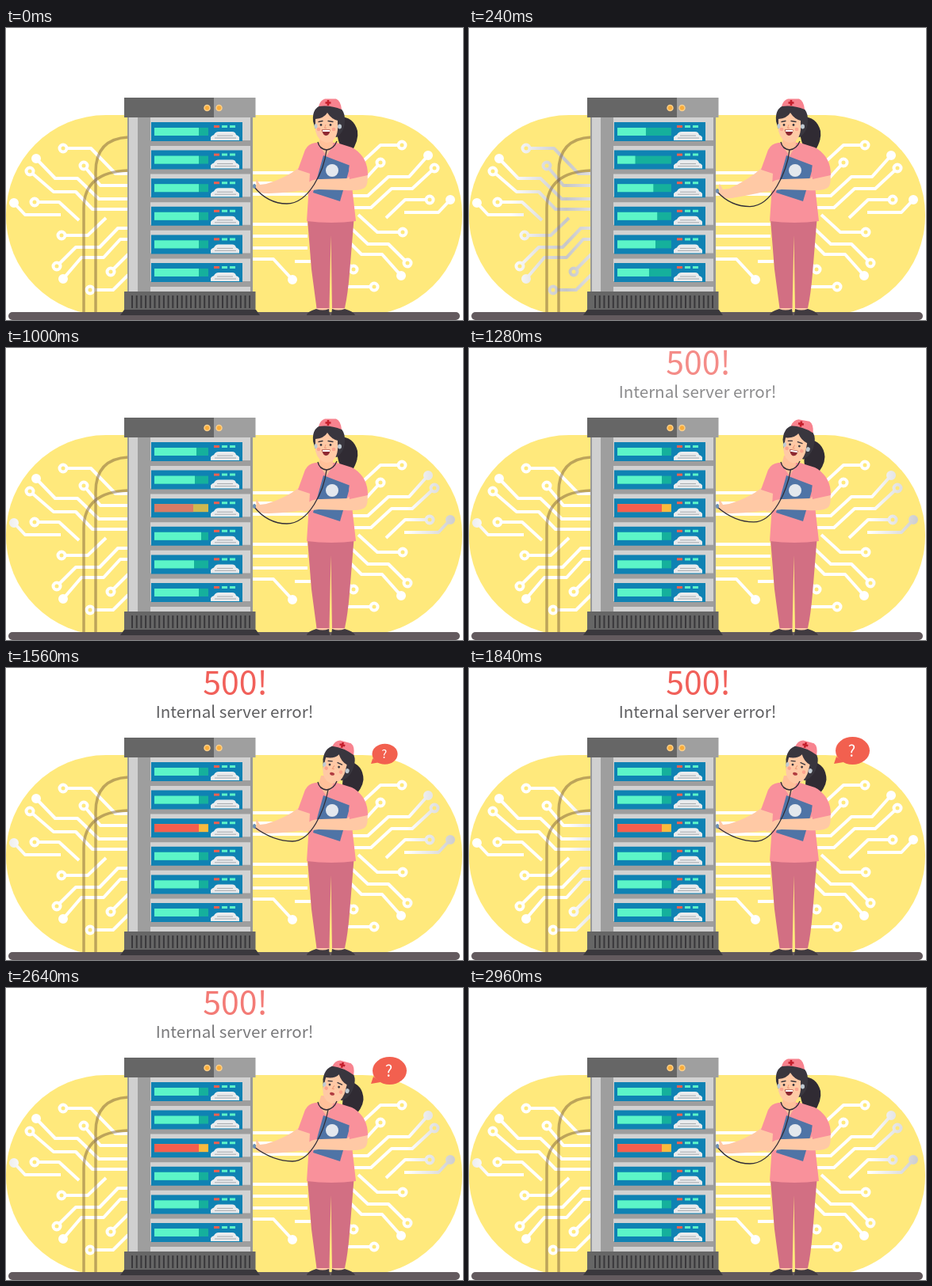
Write an HTML page that moves like this. It is 576 by 369 pixels and loops after 3 s.

```html
<!DOCTYPE html>
<html lang="en">
<head>
<meta charset="utf-8">
<style>
  html, body { margin: 0; width: 100%; height: 100%; overflow: hidden; background: #fff; }
  svg { display: block; width: 576px; height: 369px; }
  text { font-family: "Noto Sans CJK SC", "Noto Sans CJK JP", "Noto Sans", sans-serif; font-weight: 500; text-anchor: middle; }
</style>
</head>
<body>
<svg viewBox="0 0 576 369">
  <defs>
    <linearGradient id="pulse" gradientUnits="userSpaceOnUse" x1="-690" x2="70">
      <stop offset="0" stop-color="#fff"/><stop offset=".092" stop-color="#c6c6c8"/>
      <stop offset=".184" stop-color="#fff"/><stop offset=".816" stop-color="#fff"/>
      <stop offset=".908" stop-color="#c6c6c8"/><stop offset="1" stop-color="#fff"/>
    </linearGradient>
  </defs>

  <rect y="110" width="575" height="253" rx="126" fill="#ffe97c"/>
  <g id="circuits" fill="none" stroke="url(#pulse)" stroke-width="4" stroke-linejoin="round"></g>
  <g fill="none" stroke="#7d6038" stroke-opacity=".5" stroke-width="3.5">
    <path d="M154 138Q113 140 113 182V360"/>
    <path d="M154 180Q98 182 98 228V360"/>
  </g>
  <path d="M8 364H567" stroke="#635a5e" stroke-width="10" stroke-linecap="round"/>

  <g id="rack">
    <path d="M153 112H311V334H153Z" fill="#999"/>
    <path d="M155 112H166V334H155Z" fill="#d0d0d0"/>
    <path d="M166 112H182V334H166Z" fill="#9e9e9e"/>
    <path d="M182 112H308V334H182Z" fill="#d2d2d2"/>
    <path d="M149 88H262V113H149Z" fill="#666"/>
    <path d="M262 88H314.500V113H262Z" fill="#9f9f9f"/>
    <g fill="#f9ad3c" stroke="#fcd08a" stroke-width="1.500">
      <circle cx="253.500" cy="101" r="3.500"/><circle cx="268.500" cy="101" r="3.500"/>
    </g>
    <path d="M149 333H314.500V357H149Z" fill="#666"/>
    <path d="M158 346H308" stroke="#39383b" stroke-width="16" stroke-dasharray="2 3.700"/>
    <path d="M149 356H315L320 363H144Z" fill="#3a383d"/>
  </g>

  <g id="nurse">
    <path id="arm" fill="#ffc9a5"/>
    <path d="M391 350H408V358H391ZM411 350H427V358H411Z" fill="#ffc9a5"/>
    <path d="M379 363Q380 358 391 355Q399 358 407 355L408 363ZM410 363L411 355Q419 358 427 355Q438 358 440 363Z" fill="#403a40"/>
    <path d="M380 242H438.500L433 310Q431 335 427 354H411L409.500 262L407.500 354H391.500L385 305Z" fill="#d26f83"/>
    <g id="ponytail"><path d="M418 112Q438 111 443 130Q445 142 435 157Q429 150 424 151Q415 144 418 112Z" fill="#302b33"/></g>
    <path d="M390 145Q381 146 377 154L368 179L383 184L379 244Q410 248 441 244L436 200L455 188Q452 158 436 151L417 145Z" fill="#f9919b"/>
    <path d="M397 136H412V148L404 162L394 147Z" fill="#ffc09a"/>
    <path d="M400 161L434 174L421 219L387 208Z" fill="#4f74a6"/>
    <circle cx="411" cy="180" r="8" fill="#e3e8ee"/>
    <path d="M455 181Q458 200 450 203Q443 206 427 205L394 204Q383 205 374 207L379 197Q386 190 397 191L430 190L436 184Z" fill="#ffc9a5"/>
    <path d="M440 154Q456 164 456 186L433 191Q429 175 440 154Z" fill="#f9919b"/>

    <g id="head">
      <path d="M387 118Q385 98 404 96Q426 96 427 114Q428 130 417 138L391 131Z" fill="#39363e"/>
      <path d="M390 115Q401 114 405 107Q410 115 418 117V129Q416 144 404 145Q393 143 390 130Z" fill="#ffc9a5"/>
      <path d="M394 118.500L399 117.500M406 117.500L412 118.500" stroke="#39363e" stroke-width="1.300" stroke-linecap="round"/>
      <g fill="#39363e"><circle cx="397" cy="122.500" r="1.400"/><circle cx="409" cy="122.500" r="1.400"/></g>
      <g fill="#fba58f"><circle cx="394" cy="128" r="2.300"/><circle cx="413" cy="128" r="2.300"/></g>
      <path d="M403 122L401.500 126.500H404" fill="none" stroke="#eb9a78"/>
      <g id="smile">
        <path d="M398 128.500H408.500Q408 136 403 136Q399 135 398 128.500Z" fill="#8e2932"/>
        <path d="M399 129H408V131H399Z" fill="#fff"/>
      </g>
      <ellipse id="frown" cx="403" cy="133" rx="3" ry="1.900" fill="#b13b40"/>
      <g fill="#bfcad2"><ellipse cx="390.500" cy="124" rx="2" ry="3"/><ellipse cx="420.500" cy="124.500" rx="2.500" ry="3"/></g>
      <path d="M394 99Q396 91 402 89.500H416Q422 92 423 103Q409 97 394 99Z" fill="#f8838f"/>
      <path d="M406 91V98M402.500 94.500H409.500" stroke="#c51f2c" stroke-width="2.600"/>
    </g>
    <g fill="none" stroke="#302d38" stroke-width="1.300">
      <path d="M393 144Q395 153 404 154Q413 153 417 143"/>
      <path id="cord"/>
    </g>
    <ellipse id="disc" cx="313" rx="2" ry="3" fill="#6e8fb5"/>
  </g>

  <g id="bubble">
    <path d="M463 112L460 121L472 119Z" fill="#f2604f"/>
    <ellipse cx="483.500" cy="104.500" rx="21.500" ry="17.500" fill="#f2604f"/>
    <text x="482.500" y="111.500" font-size="20" fill="#fff">?</text>
  </g>
  <g id="message">
    <text x="289" y="33" font-size="41" fill="#f1605a">500!</text>
    <text x="288" y="63" font-size="20.600" fill="#5e5e60">Internal server error!</text>
  </g>
</svg>

<script>
const LOOP = 3000;
const FULL = 56;
const $ = id => document.getElementById(id);

// Traces: a path starting at its node, then the node type (ring, dot or none).
const traces = [
  ['M72 152H107L138 184H154', 'ring'], ['M98 174L119 199H154', 'ring'],
  ['M38 165L62 190H90L117 216H154', 'dot'], ['M30 181L60 207H88L109 229H154', 'ring'],
  ['M36 220H67L92 243', 'ring'], ['M10 221L24 236H69', 'dot'],
  ['M70 262H103L126 240', 'ring'], ['M64 301L88 277H118L141 253H154', 'ring'],
  ['M72 317L95 290H123L144 267H154', 'dot'], ['M132 308L154 286', 'ring'],
  ['M106 331H135L154 312', 'ring'],
  ['M499 148H472L444 174', 'ring'], ['M472 170L450 194H436', 'ring'],
  ['M532 161L508 188H482L456 212H436', 'dot'], ['M540 177L512 203H486L460 227H436', 'ring'],
  ['M534 217H503L479 240', 'ring'], ['M560 217L545 233H502', 'dot'],
  ['M500 258H468L444 236', 'ring'], ['M506 297L482 273H456L436 254', 'ring'],
  ['M498 313L474 286H448L434 272', 'dot'], ['M438 305L420 287', 'ring'],
  ['M464 327H430', 'ring'], ['M361 318L337 292H310', 'dot'],
  ['M310 183H380M310 196H380M310 210H380M310 248H380M310 263H380M310 278H380M364 295H384', '']
];
$('circuits').innerHTML = traces.map(([d, node]) => {
  const [x, y] = d.match(/\d+/g);
  const mark = node === 'ring' ? `<circle cx="${x}" cy="${y}" r="4.500" fill="#ffe97c"/>`
    : node === 'dot' ? `<circle cx="${x}" cy="${y}" r="4" fill="url(#pulse)"/>` : '';
  return `<path d="${d}"/>${mark}`;
}).join('');

// Load of each server over time: [ms, width] pairs.
const loads = [
  [[0, FULL], [520, 11], [1000, 53], [1160, FULL]],
  [[0, FULL], [260, 22], [520, 55], [760, 24], [1000, 51], [1160, FULL]],
  [[0, FULL], [520, 32], [1000, 49], [1160, FULL]],
  [[0, FULL], [520, 43], [1000, 59], [1160, FULL]],
  [[0, FULL], [520, 38], [1000, 50], [1160, FULL]],
  [[0, FULL], [520, 20], [1000, FULL], [1160, FULL]]
];
$('rack').innerHTML += loads.map((_, i) => `
  <g transform="translate(0 ${119 + i * 35.6})">
    <path d="M182 23H308V30H182Z" fill="#9e9e9e"/>
    <path d="M183 0H298V24H183Z" fill="#0f82b3"/>
    <rect class="track" x="187" y="7" width="68" height="10" fill="#15b09c"/>
    <rect class="load" x="187" y="7" height="10" fill="#5cf5c8"/>
    <path d="M262 5.500H269" stroke="#f2604f" stroke-width="3"/>
    <path d="M272 5.500H279M282 5.500H289" stroke="#5cf5c8" stroke-width="3"/>
    <path d="M258 23V19Q259 17 262 16Q264 12 268 12H285Q289 12 290 16Q293 17 294 19V23Z" fill="#e9ebed"/>
    <path d="M266 17H286M263 20H290" stroke="#a5a9ad"/>
  </g>`).join('');
const bars = document.querySelectorAll('.load');
const tracks = document.querySelectorAll('.track');

const ramp = (t, from, to) => Math.min(1, Math.max(0, (t - from) / (to - from)));
const smooth = k => k * k * (3 - 2 * k);
const ease = (t, from, to) => smooth(ramp(t, from, to));
const mix = (a, b, k) => `rgb(${a.map((v, i) => Math.round(v + (b[i] - v) * k))})`;

function along(keys, t) {
  let value = keys[0][1];
  for (let i = 1; i < keys.length; i++) {
    value += (keys[i][1] - keys[i - 1][1]) * ease(t, keys[i - 1][0], keys[i][0]);
  }
  return value;
}

function draw(t) {
  const sweep = ramp(t, t < 1620 ? 80 : 1620, t < 1620 ? 620 : 2160);
  $('pulse').setAttribute('gradientTransform', `translate(${-70 + 645 * sweep})`);

  bars.forEach((bar, i) => bar.setAttribute('width', along(loads[i], t)));
  const alarm = ramp(t, 920, 1020);
  bars[2].setAttribute('fill', mix([92, 245, 200], [245, 94, 78], alarm));
  tracks[2].setAttribute('fill', mix([21, 176, 156], [251, 186, 62], alarm));

  const drop = 16 * Math.sin(Math.PI * ramp(t, 40, 1000)) ** 2;
  const tilt = ease(t, 1080, 1400) - ease(t, 2680, 2940);
  const y = n => n + drop;
  $('arm').setAttribute('d', `M370 176Q352 ${190 + drop / 3} 328 ${y(197)}L320 ${y(198)}L316 ${y(191)}
    Q314 ${y(192)} 316 ${y(199)}L312 ${y(202)}Q319 ${y(210)} 331 ${y(209)}Q362 ${208 + drop / 3} 388 203V178Z`);
  const low = 222 + 0.6 * drop - 3 * tilt;
  const sag = 354 + 7 * tilt;
  $('cord').setAttribute('d', `M${404 + 2 * tilt} 154C401 180 ${382 + 3 * tilt} ${low} ${sag} ${low}
    Q${sag - 24} ${low} 313 ${y(201)}`);
  $('disc').setAttribute('cy', y(200));

  const turn = `rotate(${15 * tilt} 404 164)`;
  $('head').setAttribute('transform', turn);
  $('ponytail').setAttribute('transform', turn);
  const worry = ramp(t, 1280, 1400) - ramp(t, 2760, 2880);
  $('smile').setAttribute('opacity', 1 - worry);
  $('frown').setAttribute('opacity', worry);

  const pop = ease(t, 1400, 1640) - ease(t, 2680, 2900);
  $('bubble').setAttribute('transform', `translate(460 121) scale(${pop}) translate(-460 -121)`);
  $('message').setAttribute('opacity', ramp(t, 1080, 1360) - ramp(t, 2600, 2840));
}

const start = performance.now();
function tick() {
  draw((performance.now() - start) % LOOP);
  requestAnimationFrame(tick);
}
tick();
</script>
</body>
</html>
```
